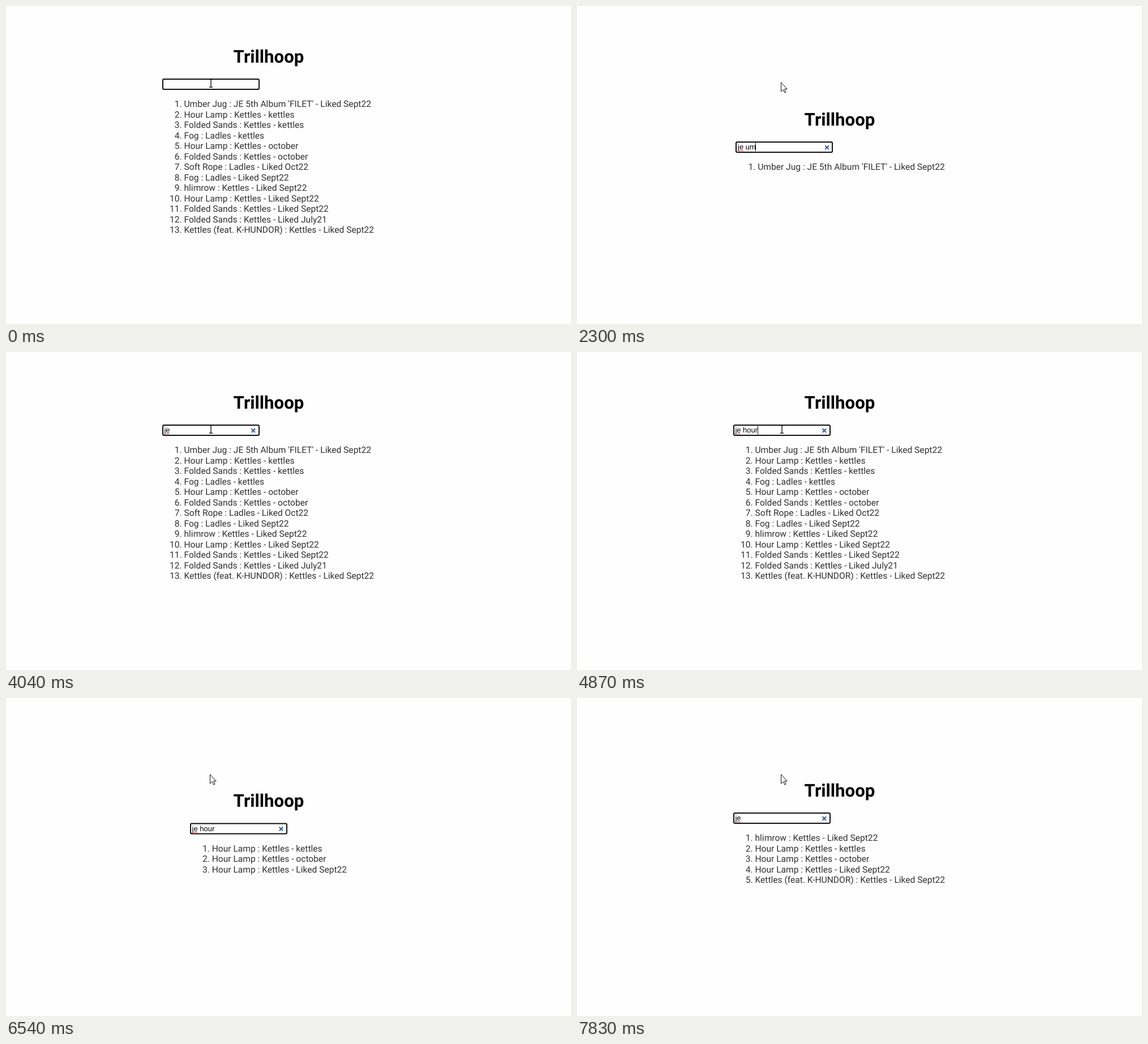
An HTML page for the animation above (8000 ms loop, 998 by 561 pixels).

```html
<!DOCTYPE html>
<html lang="en">
<head>
<meta charset="utf-8">
<title>Trillhoop</title>
<style>
  html, body { margin: 0; width: 100%; height: 100%; overflow: hidden; background: #fefefe; }
  svg { display: block; text-rendering: geometricPrecision; }
  .title { font: bold 31.2px Roboto, sans-serif; text-anchor: middle; }
  .row { font: 15.58px Roboto, sans-serif; fill: #303030; }
  .num { text-anchor: end; }
  .query { font: 12.98px "Liberation Sans", Arial, sans-serif; }
  .box { fill: #fff; stroke: #101010; stroke-width: 2; }
  .clear { stroke: #2b5aa5; stroke-width: 2; }
  .wave { fill: none; stroke: #e8343a; }
  .beam { fill: none; stroke: #111; stroke-width: 1.4; }
  .arrow { fill: #fff; stroke: #111; }
</style>
</head>
<body>
<svg id="stage" width="998" height="561" viewBox="0 0 998 561"></svg>
<script>
const LOOP = 8000, LINE = 18.5;

const songs = [
  "Umber Jug : JE 5th Album 'FILET' - Liked Sept22",
  "Hour Lamp : Kettles - kettles",
  "Folded Sands : Kettles - kettles",
  "Fog : Ladles - kettles",
  "Hour Lamp : Kettles - october",
  "Folded Sands : Kettles - october",
  "Soft Rope : Ladles - Liked Oct22",
  "Fog : Ladles - Liked Sept22",
  "hlimrow : Kettles - Liked Sept22",
  "Hour Lamp : Kettles - Liked Sept22",
  "Folded Sands : Kettles - Liked Sept22",
  "Folded Sands : Kettles - Liked July21",
  "Kettles (feat. K-HUNDOR) : Kettles - Liked Sept22"
];

const pick = ids => ids.map(i => songs[i]);
const all = { left: 275.5, rows: songs };
const jug = { left: 280.2, rows: pick([0]) };
const lamp = { left: 324.7, rows: pick([1, 4, 9]) };
const mixed = { left: 275.5, rows: pick([8, 1, 4, 9, 12]) };

// start time, view, typed text, caret x (0 = hidden), selected text
const steps = [
  [0, all, "", 0],
  [290, all, "", 280],
  [720, all, "", 0],
  [840, all, "j", 282],
  [970, all, "je", 289],
  [1410, all, "je", 0],
  [1560, all, "je ", 293],
  [2020, all, "je um", 311],
  [2300, jug, "je um", 315],
  [2580, jug, "je um", 0],
  [3040, jug, "je ", 0, "um"],
  [3610, jug, "je ", 297],
  [3740, jug, "je ", 0],
  [4040, all, "je ", 0],
  [4190, all, "je ", 293],
  [4600, all, "je h", 300],
  [4750, all, "je ho", 307],
  [4870, all, "je hour", 319],
  [5120, lamp, "je hour", 367],
  [5410, lamp, "je hour", 0],
  [5990, lamp, "je hour", 367],
  [6540, lamp, "je hour", 0],
  [7080, lamp, "je hou", 364],
  [7230, lamp, "je ho", 356],
  [7380, lamp, "je h", 349],
  [7530, lamp, "je h", 0],
  [7680, mixed, "je h", 0],
  [7830, mixed, "je ", 0]
];

const stage = document.getElementById("stage");
const beam = '<path class="beam" d="M359 129.5h2l1 .8l1 -.8h2M362 130v13M359 143.2h2l1 -.8l1 .8h2"/>';
const arrow = '<path class="arrow" d="M360.5 134.8V151l3.8-3.6 2.5 5.6 2.3-1-2.5-5.5h4.6z"/>';

function searchBox(left, text, caret, selected) {
  let out = `<rect class="box" x="${Math.round(left) + 1}" y="129" width="170" height="18" rx="2"/>`;
  if (selected)
    out += `<rect x="${left + 17}" y="130.7" width="18.3" height="14.4" fill="#0078d7"/>`;
  out += `<text class="query" x="${left + 3.9}" y="142">${text}<tspan fill="#fff">${selected}</tspan></text>`;
  if (text)
    out += `<path class="clear" d="M${left + 158} 135.3l6.6 6.6m0 -6.6l-6.6 6.6"/>`;
  if (text.includes(" "))
    out += `<path class="wave" d="M${left + 4.4} 145.2${"l1.5 -1.7l1.5 1.7".repeat(3)}"/>`;
  if (caret)
    out += `<rect x="${caret}" y="130.5" width="1" height="14.6"/>`;
  return out;
}

function row(left, text, i) {
  const y = 178 + i * LINE, x = left + 39;
  return `<text class="row num" x="${x - 3.8}" y="${y}">${i + 1}.</text>` +
    `<text class="row" x="${x}" y="${y}">${text}</text>`;
}

function draw([, { left, rows }, text, caret, selected = ""]) {
  const shift = (songs.length - rows.length) * LINE / 2;
  stage.innerHTML = `<g transform="translate(0 ${shift})">
    <text class="title" x="464" y="99.6">Trillhoop</text>
    ${searchBox(left, text, caret, selected)}
    ${rows.map((r, i) => row(left, r, i)).join("")}
  </g>${rows === songs ? beam : arrow}`;
}

let shown;
function tick() {
  const t = performance.now() % LOOP;
  const step = steps.findLast(s => s[0] <= t);
  if (step !== shown) draw(shown = step);
  requestAnimationFrame(tick);
}
tick();
</script>
</body>
</html>
```
